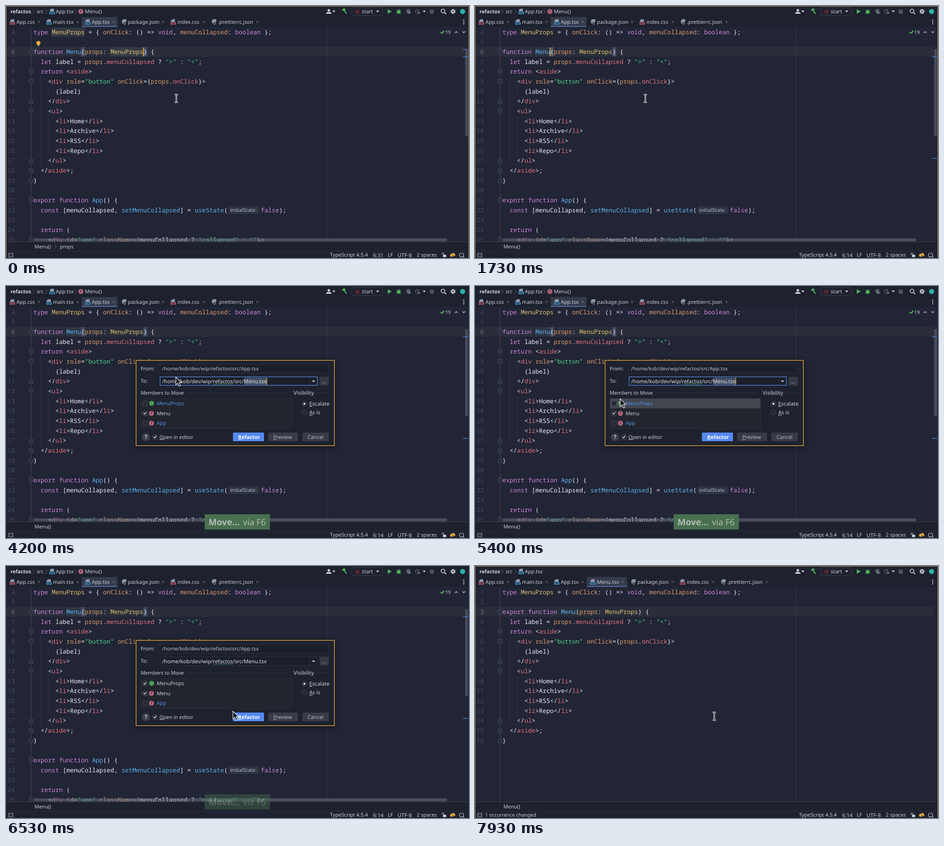
An HTML page for the animation above (8 s loop, 1014 by 552 pixels).

```html
<!DOCTYPE html>
<html lang="en">
<head>
<meta charset="utf-8">
<title>Move refactoring</title>
<style>
html, body { margin: 0; width: 100%; height: 100%; overflow: hidden; background: #1e222f; }
svg { display: block; width: 1014px; height: 552px; }
text { white-space: pre; font-family: "Noto Sans", "Open Sans", sans-serif; text-rendering: geometricPrecision; }
.mono { font-family: "Noto Sans Mono", "DejaVu Sans Mono", monospace; font-size: 13.38px; font-weight: 500; }
</style>
</head>
<body>
<svg id="stage" viewBox="0 0 1014 552"></svg>
<script>
const LOOP = 8000;
const COL = 8.03, LEFT = 60, ROW = 21.67, TOP = 57;
const INK = { k: '#cf85dc', t: '#dfc16f', f: '#5fb0ec', p: '#dc9a68', m: '#e0717e', s: '#4fd28b', w: '#eaedf3' };
const UI = '#c9ced8', DIM = '#8a91a0', ORANGE = '#d8a042';

const esc = s => s.replace(/&/g, '&amp;').replace(/</g, '&lt;');
const rect = (x, y, w, h, fill, more = '') =>
  `<rect x="${x}" y="${y}" width="${w}" height="${h}" fill="${fill}" ${more}/>`;
const circle = (x, y, r, fill, more = '') => `<circle cx="${x}" cy="${y}" r="${r}" fill="${fill}" ${more}/>`;
const path = (d, stroke, width = 1, fill = 'none') =>
  `<path d="${d}" fill="${fill}" stroke="${stroke}" stroke-width="${width}"/>`;
const shape = (d, fill) => `<path d="${d}" fill="${fill}"/>`;
const group = (id, body, more = '') => `<g id="${id}" ${more}>${body}</g>`;
const at = (x, y, body) => `<g transform="translate(${x} ${y})">${body}</g>`;
// y is the vertical middle of the capitals
const label = (x, y, s, fill = UI, size = 11.2, more = '') =>
  `<text x="${x}" y="${y + size * 0.357}" fill="${fill}" font-size="${size}" ${more}>${esc(s)}</text>`;
// "_" marks the mnemonic letter that follows it
const mnemonic = (x, y, s, fill = UI, size = 11.2, more = '') =>
  label(x, y, s, fill, size, more).replace(/_(.)/, '<tspan text-decoration="underline">$1</tspan>');
const chevron = (x, y) => path(`M${x - 2} ${y - 5}l4 5l-4 5`, '#5a6172');
const drop = (x, y, fill = UI) => shape(`M${x - 3.5} ${y - 2}h7l-3.5 4z`, fill);
const rowY = i => TOP + ROW * i;
const colX = c => LEFT + COL * c;

// Each line alternates ink key and text
const menuCode = head => [
  'k|type |t|MenuProps|w| = { |p|onClick|w|: () => |k|void|w|, |p|menuCollapsed|w|: |k|boolean|w| };',
  '',
  head + 'k|function |f|Menu|w|(|p|props|w|: |t|MenuProps|w|) {',
  'k|  let |w|label = |p|props|w|.|m|menuCollapsed|w| ? |s|">"|w| : |s|"<"|w|;',
  'k|  return |w|<|m|aside|w|>',
  'w|    <|m|div |p|role|w|=|s|"button"|p| onClick|w|={|p|props|w|.|m|onClick|w|}>',
  'w|      {label}',
  'w|    </|m|div|w|>',
  'w|    <|m|ul|w|>',
  ...['Home', 'Archive', 'RSS', 'Repo'].map(s => `w|      <|m|li|w|>${s}</|m|li|w|>`),
  'w|    </|m|ul|w|>',
  'w|  </|m|aside|w|>;',
  'w|}'
];
const appCode = [
  '',
  'k|export function |f|App|w|() {',
  'k|  const |w|[menuCollapsed, |f|setMenuCollapsed|w|] = |f|useState|w|(         |k|false|w|);',
  '',
  'k|  return |w|(',
  'w|    <|m|div |p|id|w|=|s|"app"|p| className|w|={menuCollapsed ? |s|"collapsed"|w| : |s|""|w|}>'
];

function codeLine(line, i) {
  const parts = line.split('|');
  let out = '', col = 0;
  for (let n = 0; n + 1 < parts.length; n += 2) {
    const s = parts[n + 1], lead = s.length - s.trimStart().length;
    if (s.trim()) out += `<text class="mono" x="${colX(col + lead)}" y="${rowY(i) + 4.6}" fill="${INK[parts[n]]}">${esc(s.trimStart())}</text>`;
    col += s.length;
  }
  return out;
}

function fold(i, kind) {
  const d = kind === 'up' ? 'M-4 4.5v-7l4-2.5l4 2.5v7z' : kind === 'box' ? 'M-4 -4h8v8h-8z' : 'M-4 -4.5h8v6.5l-4 3l-4 -3z';
  return at(55, rowY(i), path(d, '#525a6c', 1, '#212535') + path('M-2 0h4', '#525a6c'));
}

function editor(lines, first) {
  const numbers = lines.map((_, i) =>
    `<text class="mono" x="19.5" y="${rowY(i) + 4.6}" text-anchor="end" fill="${i === 2 ? '#69728a' : '#434a5e'}">${first + i}</text>`);
  return numbers.join('') + lines.map(codeLine).join('');
}

function fileIcon(x, y, kind) {
  if (kind === 'json') return at(x, y, shape('M3.5 -6h7v9h-9.500v-6.500z', '#8d97a8') +
    shape('M4 0h8v6h-8z', '#1e222f') + label(4, 2.6, '{}', '#aab2c0', 7, 'font-weight="700"'));
  const strip = kind === 'css' ? '#b5566a' : '#3f8fc0';
  return at(x, y, shape('M4 -6h6v6h-9v-3z', '#8d97a8') + rect(0, 0.5, 12, 5.5, strip) +
    label(1, 3.3, kind.toUpperCase(), '#161a24', 5.2, 'font-weight="700"'));
}

const tab = (x, textX, closeX, name, kind) => fileIcon(x, 35, kind) + label(textX, 35, name) +
  path(`M${closeX - 2.5} 32.500l5 5m0 -5l-5 5`, '#6d7484');

const fnIcon = (x, y) => circle(x, y, 5.5, '#b5657c') + label(x - 1.6, y, 'f', '#2a2030', 9);

function toolbar() {
  const grey = '#565d6b', green = '#4fae5c';
  return rect(0, 0, 1014, 24, '#1e222f') +
    label(10, 12, 'refactos', '#d3d7df', 11, 'font-weight="700"') + chevron(60, 12) +
    label(67, 12, 'src') + chevron(88, 12) + fileIcon(95, 12, 'tsx') + label(109, 12, 'App.tsx') +
    group('navMenu', chevron(152, 12) + fnIcon(164, 12) + label(173, 12, 'Menu()')) +
    circle(707, 9.5, 2.8, UI) + shape('M701 17q0 -4 6 -4t6 4z', UI) + drop(718, 12) +
    path('M736.500 10l4 -3.500l2.500 2.500', green, 3) + path('M740 9l6 8', green, 2.2) +
    rect(757.5, 3.5, 67, 17, 'none', 'stroke="#3b4252" rx="2"') + rect(765, 8, 9, 9, '#552533') +
    label(779, 12, 'start', UI, 11.5) + drop(814, 12) +
    shape('M836 7l9 5l-9 5z', green) +
    circle(860, 13, 4, green) + path('M855 9l10 8m0 -8l-10 8M855 13h10M858 7l2 2l2 -2', green) +
    shape('M877 8l4 -1.500l4 1.500v4q0 4 -4 5q-4 -1 -4 -5z', grey) + shape('M882 11l6 3.500l-6 3.500z', '#737a89') +
    path('M905 10a4.500 4.500 0 1 0 -3 6.500M901 9v3.500h3', grey, 1.3) + shape('M903 12l5 3l-5 3z', '#737a89') + drop(916, 12) +
    rect(928, 8, 9, 9, '#4d5360') +
    circle(957, 11, 4, 'none', `stroke="${UI}" stroke-width="1.7"`) + path('M960 14l4 4', UI, 2) +
    circle(979, 12, 3, 'none', `stroke="${UI}" stroke-width="2.5"`) +
    circle(979, 12, 4.7, 'none', `stroke="${UI}" stroke-width="1.6" stroke-dasharray="1.9 1.8"`) +
    circle(1000, 12, 5.5, '#27b5a8');
}

function tabs() {
  return rect(0, 24, 1014, 22, '#1e222f') +
    group('activeTab', '') +
    tab(8, 23, 72, 'App.css', 'css') + tab(88, 103, 157, 'main.tsx', 'tsx') + tab(173, 188, 236, 'App.tsx', 'tsx') +
    group('menuTab', tab(252, 267, 324, 'Menu.tsx', 'tsx')) +
    group('restTabs', tab(253, 267, 344, 'package.json', 'json') + tab(360, 375.5, 433, 'index.css', 'css') +
      tab(450, 464, 551, '.prettierrc.json', 'json')) +
    [31, 35, 39].map(y => circle(1002.5, y, 1.3, UI)).join('');
}

function footer() {
  return rect(0, 516, 1014, 36, '#1e222f') + rect(0, 516, 1014, 1, '#3b414f') + rect(0, 537, 1014, 1, '#2b303d') +
    label(62.5, 527, 'Menu()', UI, 11) +
    group('propsCrumb', chevron(108, 527) + label(118, 527, 'props', UI, 11)) +
    rect(5.5, 541.5, 10, 8, 'none', `stroke="${DIM}"`) + path('M8 542v7M13 542v7', DIM) +
    group('changed', label(22, 545.5, '1 occurrence changed', UI, 10.8)) +
    label(709.5, 545.5, 'TypeScript 4.5.4') +
    `<text id="position" x="804" y="549.6" fill="${UI}" font-size="11.5"></text>` +
    label(836, 545.5, 'LF') + label(857.5, 545.5, 'UTF-8', UI, 11.7) + label(899.5, 545.5, '2 spaces', UI, 11) +
    rect(957, 545, 7, 5, UI) + path('M955 545v-2q0 -2 2 -2t2 2v2', UI, 1.2) +
    circle(976, 546, 3.5, '#dfa63e') + circle(980, 545, 3.8, '#dfa63e') + path('M979 545v5l-2 -2m2 2l2 -2', '#1e222f') +
    path('M997.500 541a4.500 4.500 0 1 0 3.200 7.700l2 1l-.8 -2.600a4.500 4.500 0 0 0 -4.400 -6.100z', UI, 1.2);
}

function checkbox(x, y, id = '', on = true) {
  const tick = path(`M${x - 2.5} ${y}l2 2.500l3.500 -5`, '#d5d9e0', 1.5);
  return rect(x - 4.5, y - 4.5, 10, 10, '#242933', 'stroke="#474e5d" rx="1"') + (id ? group(id, tick) : on ? tick : '');
}

function dialog() {
  const blue = '#4d92e6';
  const button = (x, w, textX, s, fill, ink, more) =>
    rect(x, 321, w, 19, fill, 'rx="1.5"') + mnemonic(textX, 331, s, ink, 11.2, more);
  const field = (y, w) => rect(337.5, y, w, 19, '#1b1f2a', 'stroke="#2d3240"');
  return rect(284.75, 162.75, 434.5, 187, '#1e222e', `stroke="${ORANGE}" stroke-width="1.5" style="filter:drop-shadow(0 3px 7px #0007)"`) +
    label(295, 181, 'From:') + field(171.5, 369) + label(342, 181, '/home/kob/dev/wip/refactos/src/App.tsx', '#bfc4cf', 11.1) +
    label(295, 208.5, 'To:') + field(199, 344.5) +
    group('focus', rect(337.5, 199, 344.5, 18.5, 'none', 'stroke="#4f7fd0" stroke-width="1.4"') +
      rect(521.5, 201, 49.5, 15.5, '#465067') + rect(570.5, 201, 1.3, 15.5, '#e6b640')) +
    label(342, 208.5, '/home/kob/dev/wip/refactos/src/Menu.tsx', '#dde1e8', 11.5) +
    path('M453.500 216' + 'l2 -2l2 2'.repeat(11), '#3f9d68') +
    rect(665, 201, 1, 15.5, '#2d3240') + drop(673.5, 209) +
    rect(687, 199, 20, 19, '#343944', 'rx="1.5"') + label(692, 209, '...') +
    label(295, 234, 'Members to Move', UI, 11.1) + rect(394, 234, 220, 1, '#333947') +
    label(630, 234, 'Visibility', UI, 11.6) + rect(679, 234, 29, 1, '#333947') +
    rect(295.5, 246.5, 330, 65, '#22252d', 'stroke="#2e323d"') + rect(296, 246.5, 329, 21.5, '#42464f', 'id="hover"') +
    checkbox(304, 257, 'propsTick') + circle(319, 257, 5.5, '#4f9a58') +
    label(330, 257.5, 'MenuProps', blue, 11.1, 'id="propsName"') +
    checkbox(304, 278.5) + fnIcon(318.5, 279) + label(330, 279, 'Menu', UI, 11.1) +
    checkbox(304, 300, '', false) + fnIcon(318.5, 300.5) + label(330, 300.5, 'App', blue, 11.1) +
    [258, 277].map(y => circle(653.5, y, 5.5, '#242933', 'stroke="#474e5d"')).join('') + circle(653.5, 258, 2.3, '#dce0e7') +
    mnemonic(664, 258, '_Escalate', UI, 11.7) + mnemonic(664, 277, '_As is', UI, 11.5) +
    circle(306.5, 331, 9, '#3a3f4b') + label(303.8, 331, '?', '#d3d7df', 12, 'font-weight="700"') +
    checkbox(326, 330.5) + mnemonic(336, 331, '_Open in editor', UI, 10.9) +
    button(497, 68, 508.5, '_Refactor', '#5489f0', '#fff', 'font-weight="700"') +
    button(574, 65.5, 585.5, '_Preview', '#363b46', '#b5bbc6') +
    button(649, 58, 660.5, 'Cancel', '#363b46', '#b5bbc6');
}

const mark = (col, row, len, fill) => rect(colX(col), rowY(row) - 10, COL * len, 20, fill);
const stripe = y => rect(1001, y, 11, 1.6, '#4778d8');

document.getElementById('stage').innerHTML =
  rect(0, 0, 1014, 552, '#212535') +
  rect(0, 89.5, 1004, 21.5, '#2a2e3b') + rect(702, 46, 1, 470, '#343a48') +
  rect(54.5, 46, 1, 470, '#454c5c') +
  rect(76, 155, 1, 195, '#303646') + rect(92, 177, 1, 21, '#303646') + rect(92, 242, 1, 86, '#303646') +
  group('markType', mark(5, 0, 9, '#323842') + mark(21, 2, 9, '#353b44') + stripe(94)) +
  group('markProps', mark(14, 2, 5, '#353b44') + mark(14, 3, 5, '#323842') + mark(32, 5, 5, '#323842') + stripe(125)) +
  group('markMenu', mark(9, 2, 4, '#2e3644') + stripe(333)) +
  group('brackets', mark(13, 2, 1, '#475068') + mark(30, 2, 1, '#475068')) +
  [2, 4, 5, 8].map(i => fold(i)).join('') + [7, 13, 14, 15].map(i => fold(i, 'up')).join('') +
  group('appView', editor([...menuCode(''), ...appCode], 4) + fold(17) + fold(21, 'box') +
    rect(487, 438, 68, 18, '#2d3241', 'rx="3"') + label(491, 447, 'initialState:', '#b5bbc7', 11.1) +
    rect(61, 509, 905, 6.5, '#6a7080', 'opacity=".55"') + rect(1005.5, 94, 6.5, 191, '#565c6b', 'opacity=".7"') + stripe(110.5)) +
  group('menuView', editor(menuCode('k|export |'), 1)) +
  group('bulb', circle(71, 81, 4.5, '#e9ad35') + rect(69, 85, 4, 3, '#9298a4')) +
  rect(0, 91, 1.8, 19, '#e6b640', 'id="caret"') +
  group('inspections', path('M951 57l3 3l5 -6', '#4fae5c', 1.8) + path('M956 60l4 -5', '#4fae5c', 1.5) +
    label(962, 57, '19', UI, 10.5) + path('M983 59l3 -3l3 3M999.500 55.500l3 3l3 -3', UI, 1.3)) +
  toolbar() + tabs() + footer() +
  group('windowEdge', path('M.5 552V.5H1013.500V552', '#b98b3d')) +
  group('dialog', dialog()) +
  group('hint', rect(435, 500, 143, 33.5, '#49704f') +
    label(443.5, 517, 'Move...', '#b3bcb5', 19.2, 'font-weight="700"') + label(519, 517, 'via F6', '#b3bcb5', 18.6)) +
  group('beam', ['#f0f2f5', '#20232c'].map((c, i) =>
    path('M-3.500 -8.500q3.500 0 3.500 1.500q0 -1.500 3.500 -1.500M0 -7v14M-3.500 8.500q3.500 0 3.500 -1.500q0 1.500 3.500 1.500', c, 3 - i * 2)).join('')) +
  group('arrow', path('M0 0v17l4 -3.500l3 6.500l3 -1.400l-3 -6.300h5.300z', '#f0f2f5', 1.2, '#15171d'));

const el = {};
document.querySelectorAll('[id]').forEach(e => { el[e.id] = e; });
const show = (id, on) => { el[id].style.display = on ? '' : 'none'; };
const move = (id, x, y) => el[id].setAttribute('transform', `translate(${x} ${y})`);
const clamp = v => Math.max(0, Math.min(1, v));
const ramp = (t, a, b) => clamp((t - a) / (b - a));

const pointerKeys = [[4870, 372, 199.5], [5400, 318, 247], [5670, 304, 257], [5900, 304, 257], [6530, 497, 318], [6730, 523, 328]];
function pointer(t) {
  let [, x, y] = pointerKeys[0];
  for (let i = 1; i < pointerKeys.length; i++) {
    const [t0, x0, y0] = pointerKeys[i - 1], [t1, x1, y1] = pointerKeys[i];
    if (t < t0) break;
    const u = ramp(t, t0, t1), e = u * u * (3 - 2 * u);
    x = x0 + (x1 - x0) * e;
    y = y0 + (y1 - y0) * e;
  }
  return [x, y];
}

function render(t) {
  const col = t < 470 ? 31 : t < 800 ? 22 : t < 1070 ? 20 : t < 1330 ? 15 : 14;
  const open = t >= 2600 && t < 7070;
  const moved = t >= 7600;
  const clicked = t >= 5730;

  show('appView', !moved);
  show('menuView', moved);
  show('menuTab', moved);
  show('navMenu', !moved);
  show('changed', moved);
  show('inspections', t < 7930);
  move('restTabs', moved ? 88.5 : 0, 0);
  const [tabX, tabW] = moved ? [245, 88] : [166, 78];
  el.activeTab.innerHTML = rect(tabX, 24, tabW, 22, '#353b4a') + rect(tabX, 43.5, tabW, 2.5, '#4a6394');

  show('bulb', t < 470);
  show('propsCrumb', col > 14);
  show('markType', col > 20);
  show('markProps', col === 20 || col === 15);
  show('markMenu', t >= 1530 && !moved);
  show('brackets', !moved && (col === 31 || col < 20));
  show('caret', !open && !moved);
  el.caret.setAttribute('x', colX(col - 1) - 0.7);
  el.position.textContent = '6:' + col;

  show('windowEdge', !open);
  show('dialog', open);
  show('focus', !clicked);
  show('propsTick', clicked);
  el.propsName.setAttribute('fill', clicked ? UI : '#4d92e6');
  el.hint.setAttribute('opacity', Math.min(ramp(t, 2330, 2600), 1 - ramp(t, 6300, 6700)));

  const [x, y] = pointer(t);
  const row = Math.floor((y - 246.5) / 21.6);
  show('hover', x > 296 && x < 625 && row >= 0 && row < 3);
  el.hover.setAttribute('y', 246.5 + 21.6 * row);
  show('arrow', open);
  show('beam', !open);
  move('arrow', x, y);
  move('beam', x + 1, t < 2600 ? 202.5 : 329);
}

const start = performance.now();
function tick() {
  render((performance.now() - start) % LOOP);
  requestAnimationFrame(tick);
}
tick();
</script>
</body>
</html>
```
